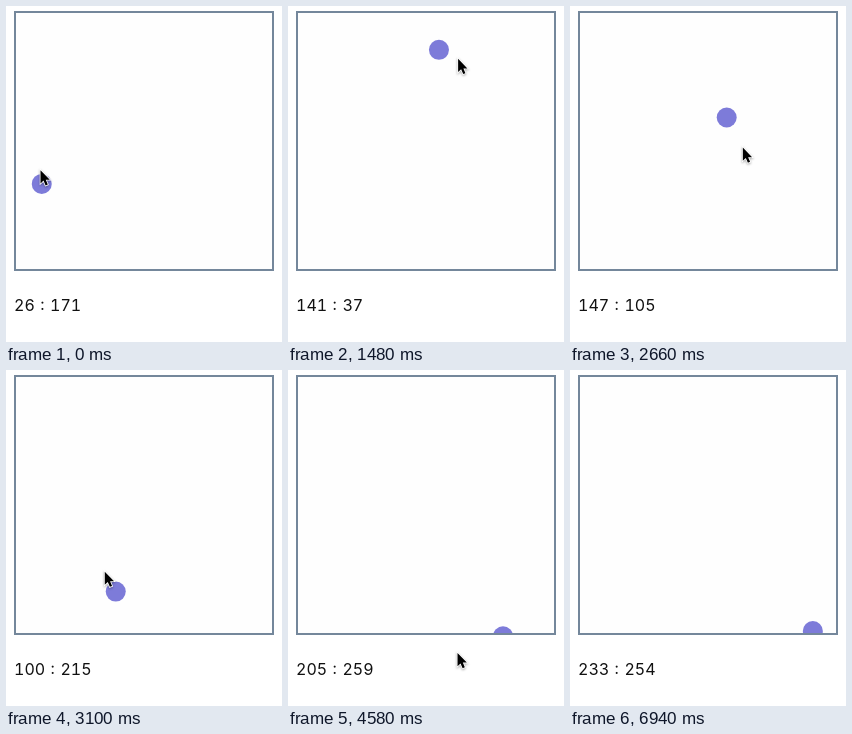
Animation, 276 px wide and 336 px high, one loop 7.62 s. Source, as an HTML page:

```html
<!DOCTYPE html>
<html lang="en">
<head>
<meta charset="utf-8">
<title>Pointer follower</title>
<style>
  html, body { margin: 0; width: 100%; height: 100%; overflow: hidden; background: #fff; }
  svg { display: block; }
  text { font: 16px Inter, sans-serif; font-variant-numeric: tabular-nums; word-spacing: 1.2px; fill: #111; }
  #cursor { filter: drop-shadow(0 1px 1px #0005); }
</style>
</head>
<body>
<svg width="276" height="336" viewBox="0 0 276 336">
  <clipPath id="inside"><rect x="10" y="7" width="256" height="256"/></clipPath>
  <rect x="9" y="6" width="258" height="258" fill="#fefefe" stroke="#74879b" stroke-width="2"/>
  <g clip-path="url(#inside)"><circle id="ball" r="10" fill="#7d7bd9"/></g>
  <text id="label" x="8" y="305"></text>
  <path id="cursor" d="M.5 1V14.2L3.5 11.4L5.6 16.2L7.8 15.3L5.8 10.6H9.8Z"
        stroke="#fff" stroke-width="1.6" paint-order="stroke"/>
</svg>
<script>
const LOOP = 7620, STEP = 147.5, LEAD = 0.4;
const REST = 40, RESUME = 44, GONE = 47;   // in steps
const ball = document.getElementById('ball');
const label = document.getElementById('label');
const cursor = document.getElementById('cursor');

// Turning points of the circling hand on each axis: [step, position]
const swingX = [[-2, 60], [.4, 34], [4.54, 100], [6.63, 40], [12.65, 227], [16.07, 85],
  [19, 182], [21.74, 95], [27.82, 248], [35.4, 75], [40, 218], [43.4, 257]];
const swingY = [[-.3, 181.5], [2, 95], [5.3, 231], [9.7, 42], [14.4, 225], [17.3, 89],
  [20.1, 243], [23.8, 89], [31.4, 282], [38.3, 135], [40, 184], [43.4, 305]];

// Half a cosine wave from one turning point to the next
function swing(turns, s) {
  const next = turns.findIndex(turn => turn[0] >= s);
  const [[from, a], [to, b]] = turns.slice(next - 1, next + 1);
  return a + (b - a) * (1 - Math.cos(Math.PI * (s - from) / (to - from))) / 2;
}

const pointAt = s => [swing(swingX, s), swing(swingY, s)];

function draw(time) {
  const step = Math.floor((time % LOOP) / STEP);
  const resting = step >= REST && step < RESUME;
  const s = resting ? REST : step < REST ? step : Math.min(step - 3, 43);

  // The ball stays put while the pointer is outside the box
  const [x, y] = pointAt(s > 30 && s < 33 ? 30 : Math.min(s, 42));
  ball.setAttribute('cx', x);
  ball.setAttribute('cy', y);
  label.textContent = `${Math.round(x - 10)} : ${Math.round(y - 7)}`;

  cursor.setAttribute('transform', `translate(${pointAt(s + (resting ? 0 : LEAD))})`);
  cursor.setAttribute('visibility', step < GONE ? 'visible' : 'hidden');
}

let start;
function tick(now) {
  start ??= now;
  draw(now - start);
  requestAnimationFrame(tick);
}
draw(0);
requestAnimationFrame(tick);
</script>
</body>
</html>
```
